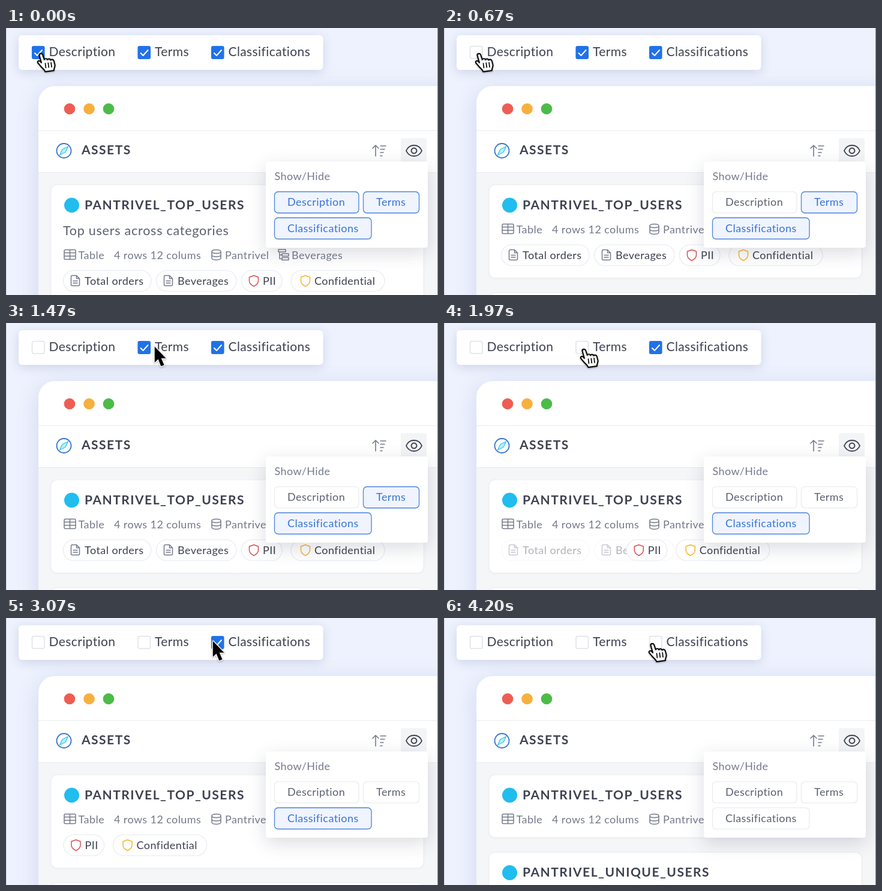
These frames come from a looping animation (720x446 px, 4.23 s). An HTML page with a canvas:

```html
<!DOCTYPE html>
<html lang="en">
<head>
<meta charset="utf-8">
<title>Show and hide asset details</title>
<style>
html, body { margin: 0; width: 100%; height: 100%; overflow: hidden; background: #eef2fe; }
canvas { display: block; width: 720px; height: 446px; }
</style>
</head>
<body>
<canvas id="stage"></canvas>
<script>
const W = 720, H = 446, LOOP = 4230;
const canvas = document.getElementById('stage');
const ctx = canvas.getContext('2d');
const dpr = window.devicePixelRatio || 1;
canvas.width = W * dpr;
canvas.height = H * dpr;

const INK = '#3d4150', GREY = '#747a8c', BLUE = '#2172e8', LINE = '#e8eaef';
const clamp = v => Math.max(0, Math.min(1, v));
const ease = (t, start, length) => {
  const p = clamp((t - start) / length);
  return p * p * (3 - 2 * p);
};

// Cursor stops: time, x, y of the tip
const STOPS = [
  [0, 59, 42], [830, 59, 42], [1330, 253, 42], [1470, 248, 40], [1600, 234, 43],
  [2530, 234, 43], [3030, 345, 39], [3070, 345, 39], [3140, 348, 42], [LOOP, 348, 42]
];
const isArrow = t => (t > 880 && t < 1590) || (t > 2590 && t < 3105);

function cursorAt(t) {
  let i = 1;
  while (i < STOPS.length - 1 && STOPS[i][0] <= t) i++;
  const a = STOPS[i - 1], b = STOPS[i];
  const p = ease(t, a[0], b[0] - a[0]);
  return [a[1] + (b[1] - a[1]) * p, a[2] + (b[2] - a[2]) * p];
}

function box(x, y, w, h, r, fill, stroke, lw = 1) {
  ctx.beginPath();
  ctx.roundRect(x, y, w, h, r);
  if (fill) { ctx.fillStyle = fill; ctx.fill(); }
  if (stroke) { ctx.strokeStyle = stroke; ctx.lineWidth = lw; ctx.stroke(); }
}

function raised(x, y, w, h, r, color, blur, dy) {
  ctx.save();
  ctx.shadowColor = color;
  ctx.shadowBlur = blur * dpr;
  ctx.shadowOffsetY = dy * dpr;
  box(x, y, w, h, r, '#fff');
  ctx.restore();
}

function disc(x, y, r, color) {
  ctx.beginPath();
  ctx.arc(x, y, r, 0, Math.PI * 2);
  ctx.fillStyle = color;
  ctx.fill();
}

function text(s, x, y, size, color, gap = 0.45, weight = 400) {
  ctx.font = `${weight} ${size}px Lato, "Open Sans", sans-serif`;
  ctx.letterSpacing = gap + 'px';
  ctx.fillStyle = color;
  ctx.fillText(s, x, y);
}

const title = (s, x, y) => text(s, x, y, 21, INK, 1.5, 700);

function line(d, x, y, color, lw = 1.5, fill) {
  ctx.save();
  ctx.translate(x, y);
  const path = new Path2D(d);
  if (fill) { ctx.fillStyle = fill; ctx.fill(path); }
  ctx.strokeStyle = color;
  ctx.lineWidth = lw;
  ctx.lineJoin = ctx.lineCap = 'round';
  ctx.stroke(path);
  ctx.restore();
}

function faded(alpha, draw) {
  if (alpha <= 0) return;
  ctx.save();
  ctx.globalAlpha *= alpha;
  draw();
  ctx.restore();
}

const ICON = {
  table: 'M2 0H17Q19 0 19 2V14Q19 16 17 16H2Q0 16 0 14V2Q0 0 2 0ZM0 5H19M0 10.5H19M9.5 0V16',
  store: 'M0 3C0-1 15-1 15 3C15 7 0 7 0 3V13.5C0 18 15 18 15 13.5V3M0 8.5C0 12.5 15 12.5 15 8.5',
  tree: 'M0 0H12V4H0ZM6 7H17V11H6ZM6 13.5H17V17.5H6ZM2 4V15.5H6M2 9H6',
  doc: 'M2 0H9L14 5V15Q14 17 12 17H2Q0 17 0 15V2Q0 0 2 0ZM9 0V5H14M3.5 9H10.5M3.5 12.5H10.5',
  shield: 'M7.5 0L15 2.8V9C15 13 11.5 16 7.5 18C3.5 16 0 13 0 9V2.8Z',
  eye: 'M0 9C5-3 21-3 26 9C21 21 5 21 0 9ZM8.5 9A4.5 4.5 0 1 0 17.5 9A4.5 4.5 0 1 0 8.5 9',
  sort: 'M5 18V0M0 5L5 0L10 5M13 1H22M13 6.5H20M13 12H18M13 17.5H16',
  hand: 'M-3 2.5C-3-1 2.4-1.2 3 2.2L4.6 10.5C6 8.4 9.8 9 10 11.5C11.5 9.4 15 10 15.3 12.7C17 11 20.5 12 20.8 15L21.6 22C21.6 25 19 27 18.6 31H3.5C3 27-1 24.5-3.5 20L-7 14.8C-8.5 11.5-4.5 10.2-2.3 13L-1 15Z',
  fingers: 'M5.5 18V25.5M10.5 18V25.5M15.5 18V25.5',
  arrow: 'M0 0V25.5L5.7 20.2L10.5 32L15.3 30L10.4 18.7H18Z'
};

function checkbox(x, label, on) {
  box(x + 0.5, 30.5, 20.5, 20.5, 3, '#fff', '#dfe2e9', 1.5);
  faded(on, () => {
    box(x, 30, 21.5, 22, 3, BLUE);
    line('M0 5L4 9L12 0', x + 5, 37, '#fff', 2);
  });
  text(label, x + 28.5, 47, 21, INK, 0.4);
}

function pill(label, x, y, w, on) {
  box(x, y, w, 35.5, 6, '#fff', LINE, 1.2);
  text(label, x + 21.5, y + 23.5, 18, '#5b6070');
  faded(on, () => {
    box(x, y, w, 35.5, 6, '#f0f4fe', '#4b83e0', 1.3);
    text(label, x + 21.5, y + 23.5, 18, '#3674d6');
  });
}

function chip(label, icon, color, x, y, w, inset = 12) {
  box(x, y, w, 35, 17.5, '#fff', LINE, 1.2);
  line(ICON[icon], x + inset + 1, y + 8.5, color);
  text(label, x + inset + 23.5, y + 23.5, 18, INK);
}

function card(y, h) {
  raised(75, y, 621, h, 10, 'rgba(40,50,80,.05)', 4, 1);
  box(75, y, 621, h, 10, null, '#eceef2');
}

function heading(label, y) {
  disc(109.5, y + 34, 12.5, '#20bdee');
  title(label, 131, y + 40.5);
}

function details(y) {
  line(ICON.table, 97, y - 15, GREY);
  text('Table', 120.5, y, 18, GREY);
  text('4 rows 12 colums', 180, y, 18, GREY, 0.4);
  line(ICON.store, 343, y - 15, GREY);
  text('Pantrivel', 365, y, 18, GREY);
  line(ICON.tree, 454, y - 15.5, GREY);
  text('Beverages', 476, y, 18, GREY);
}

function frameWindow() {
  raised(54, 97, 690, 400, [27, 0, 0, 0], 'rgba(90,110,170,.2)', 36, 8);
  disc(106, 135, 9.3, '#ee5d53');
  disc(138.5, 135, 9.3, '#f7b03e');
  disc(171, 135, 9.3, '#4dbb48');
  ctx.fillStyle = '#eaecf0';
  ctx.fillRect(54, 171, 666, 1);
  ctx.fillStyle = '#f5f6f8';
  ctx.fillRect(54, 241, 666, 205);
  ctx.fillStyle = '#e8eaee';
  ctx.fillRect(54, 241, 666, 1);

  ctx.beginPath();
  ctx.arc(96.5, 205, 12, 0, Math.PI * 2);
  ctx.strokeStyle = '#3672d2';
  ctx.lineWidth = 1.8;
  ctx.stroke();
  line('M7-7L2.5 2.5L-7 7L-2.5-2.5Z', 96.5, 205, '#35c6ea', 1.3, '#b5f0f8');
  title('ASSETS', 126, 210.5);
  line(ICON.sort, 611, 196, GREY, 1.6);
  box(658, 184, 43, 42, 3, '#f3f4f6');
  line(ICON.eye, 667, 196, INK, 1.9);
}

function assets([desc, terms, classes, settle]) {
  const up = 43 * desc;
  const cut = 51 * classes + settle;
  card(262, 198.5 - up - cut);
  heading('PANTRIVEL_TOP_USERS', 262);
  faded(1 - clamp(desc * 2), () => text('Top users across categories', 95, 345.5, 21.5, '#5b6070', 0.75));
  details(385.5 - up);

  const y = 405 - up;
  faded(1 - clamp(terms * 2), () => {
    chip('Total orders', 'doc', GREY, 95.5, y, 146.5);
    chip('Beverages', 'doc', GREY, 250.5, y, 133.5);
  });
  faded(1 - clamp(classes * 1.6), () => {
    const left = 296.5 * terms;
    chip('PII', 'shield', '#d8504e', 392.5 - left, y, 67.5);
    chip('Confidential', 'shield', '#f5b52e', 475 - left, y, 156, 15.5);
  });

  const next = 485.5 - up - cut;
  card(next, 198);
  heading('PANTRIVEL_UNIQUE_USERS', next);
}

function popup(on) {
  raised(433, 223, 270, 144, 4, 'rgba(40,50,80,.17)', 30, 9);
  text('Show/Hide', 447.5, 253.5, 18, GREY);
  pill('Description', 447.5, 273.5, 140.5, on[0]);
  pill('Terms', 595.5, 273.5, 93, on[1]);
  pill('Classifications', 447.5, 317, 161.5, on[2]);
}

function cursor(t) {
  const [x, y] = cursorAt(t);
  ctx.save();
  ctx.translate(x, y);
  ctx.shadowColor = 'rgba(0,0,0,.3)';
  ctx.shadowBlur = 3 * dpr;
  ctx.shadowOffsetY = dpr;
  if (isArrow(t)) {
    line(ICON.arrow, 0, 0, '#fff', 3.4);
    ctx.shadowColor = 'transparent';
    line(ICON.arrow, 0, 0, '#000', 0.5, '#000');
  } else {
    ctx.translate(-1, 1);
    ctx.rotate(-0.13);
    ctx.scale(0.97, 0.99);
    line(ICON.hand, 0, 0, '#000', 2, '#fff');
    ctx.shadowColor = 'transparent';
    line(ICON.fingers, 0, -1, '#000', 1.7);
  }
  ctx.restore();
}

function draw(t) {
  ctx.setTransform(dpr, 0, 0, dpr, 0, 0);
  ctx.fillStyle = '#eef2fe';
  ctx.fillRect(0, 0, W, H);

  const clicks = [30, 1800, 3140];
  const on = clicks.map(c => 1 - ease(t, c, 130));
  const gone = clicks.map(c => ease(t, c + 30, 390));
  gone.push(1.4 * gone[2] * (1 - ease(t, 3600, 450)));

  frameWindow();
  assets(gone);
  popup(on);
  raised(21, 12, 507.5, 58, 6, 'rgba(50,65,110,.17)', 17, 4);
  checkbox(43, 'Description', on[0]);
  checkbox(219.5, 'Terms', on[1]);
  checkbox(342, 'Classifications', on[2]);
  ctx.fillStyle = '#cdd0d9';
  ctx.fillRect(0, 0, 1, H);
  ctx.fillStyle = '#7f8188';
  ctx.fillRect(719, 0, 1, H);
  cursor(t);
}

const begin = performance.now();
function tick() {
  draw((performance.now() - begin) % LOOP);
  requestAnimationFrame(tick);
}
draw(0);
requestAnimationFrame(tick);
</script>
</body>
</html>
```
